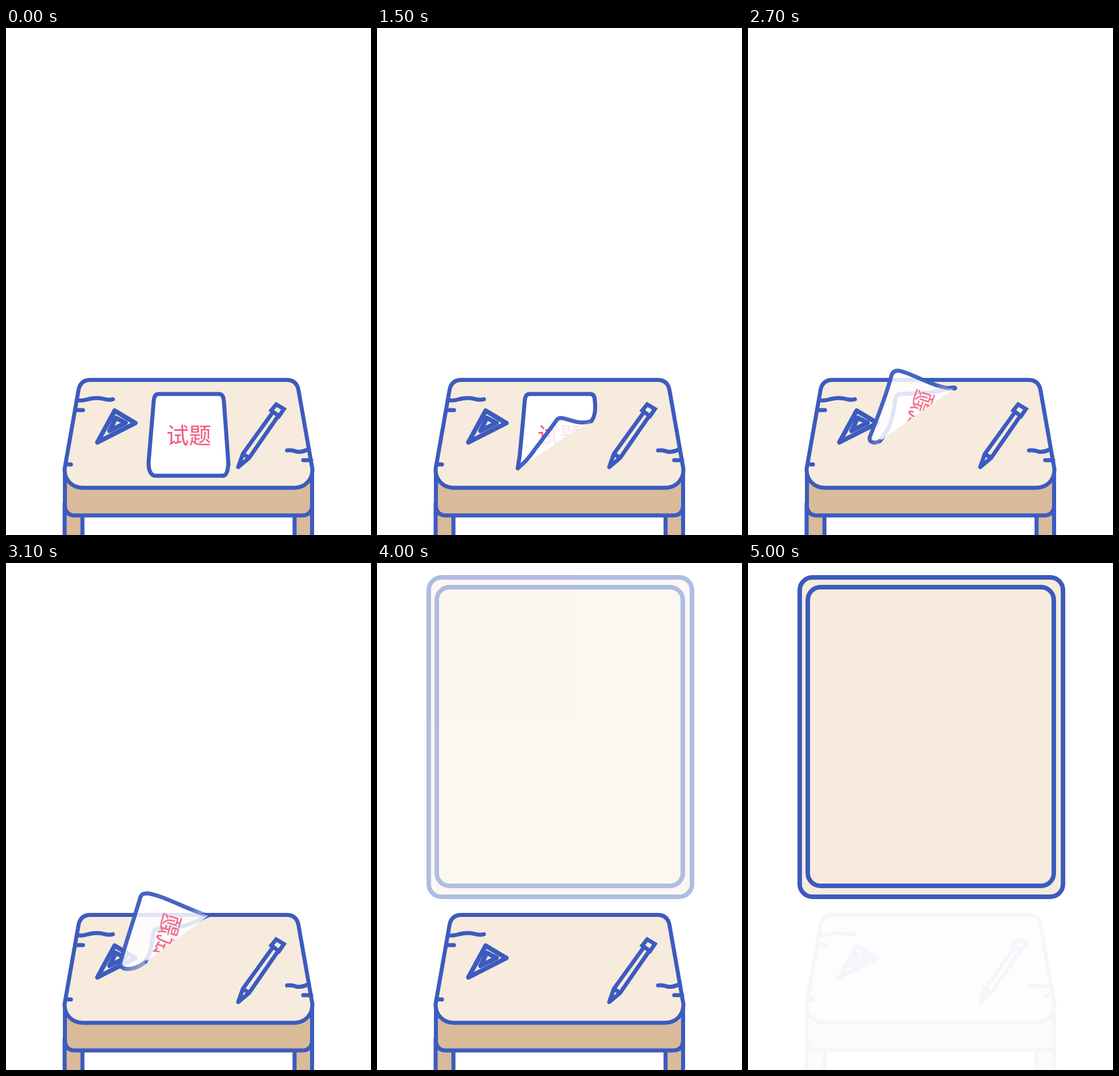
These frames come from a looping animation (635x881 px, 5200 ms). An HTML page without scripts:

```html
<!DOCTYPE html>
<html lang="zh">
<head>
<meta charset="utf-8">
<title>Desk and paper</title>
<style>
html, body { margin: 0; width: 100%; height: 100%; overflow: hidden; background: #fff; }
svg { display: block; width: 635px; height: 881px; }

.line { stroke: #3c5bbf; stroke-width: 7; stroke-linecap: round; stroke-linejoin: round; }
.cream { fill: #f6ebdc; }
.tan { fill: #d9bb9a; }
.none { fill: none; }
.word {
  font: 400 39px "Noto Sans CJK SC", "Noto Sans CJK", sans-serif;
  fill: #f2577c; text-anchor: middle;
}

/* everything advances in 100 ms ticks */
.desk, .board, .sheet, .front, .flap, .back, .fade {
  animation: 5.2s -5ms infinite;
}
.desk { animation-name: desk; }
.board { animation-name: board; }
.sheet { animation-name: sheet; }
.front { animation-name: front; }
.flap { animation-name: flap; }
.back { animation-name: back; }
.fade { animation-name: fade; }

@keyframes desk {
  0% { opacity: 1; animation-timing-function: steps(1); }
  84.615% { opacity: 1; animation-timing-function: steps(1); }
  86.538% { opacity: .98; animation-timing-function: steps(5); }
  96.154%, 100% { opacity: .05; }
}
@keyframes board {
  0% { opacity: 0; animation-timing-function: steps(1); }
  67.308% { opacity: 0; animation-timing-function: steps(12); }
  90.385% { opacity: .98; animation-timing-function: steps(1); }
  92.308%, 100% { opacity: 1; }
}
@keyframes sheet {
  0% { transform: translate(0, 0); opacity: 1; animation-timing-function: steps(1); }
  59.615% { transform: translate(0, 0); opacity: 1; animation-timing-function: steps(1); }
  61.538% { transform: translate(-5px, -5px); opacity: 1; animation-timing-function: steps(4); }
  69.231% { transform: translate(-18px, -182px); opacity: .23; animation-timing-function: steps(1); }
  71.154% { transform: translate(-21px, -226px); opacity: .04; animation-timing-function: steps(1); }
  73.077%, 100% { transform: translate(-25px, -270px); opacity: 0; }
}

/* part of the sheet still lying on the desk, open along the fold */
@keyframes front {
  0%, 3.846% {
    d: path("M377 778L259 778Q248 776 248 755C251 720 254 685 257 648Q258 636 265 636C300 636 336 636 371 636Q378 636 379 648C382 685 384 720 387 758");
    animation-timing-function: steps(6);
  }
  15.385% {
    d: path("M264 778L259 778Q248 776 248 755C251 720 254 685 257 648Q258 636 265 636C300 636 336 636 371 636Q378 636 379 648C381 680 389 712 384 732");
    animation-timing-function: steps(7);
  }
  28.846% {
    d: path("M245 765L245 764Q246 757 248 745C251 715 254 685 257 648Q258 636 265 636C300 636 336 636 371 636Q379 636 379 648C381 665 379 675 373 683");
    animation-timing-function: steps(5);
  }
  38.462% {
    d: path("M234 747L235 745Q240 738 244 725C251 705 253 680 257 648Q258 636 265 636C300 636 336 636 366 636Q376 636 377 643C377 649 376 652 371 656");
    animation-timing-function: steps(3);
  }
  44.231% {
    d: path("M226 738L228 735Q236 725 243 708C250 690 254 670 256 648Q258 636 265 636C295 636 330 638 350 634Q374 629 373 633C372 637 368 642 362 646");
    animation-timing-function: steps(3);
  }
  50% {
    d: path("M226 724L228 722Q238 708 243 700C250 682 254 668 256 648Q257 636 265 636C285 635 315 636 338 631Q364 623 365 627C365 629 363 629 360 630");
    animation-timing-function: steps(5);
  }
  59.615%, 61.538% {
    d: path("M243 692L244 690Q249 682 251 674C254 664 255 655 256 646Q257 636 265 635C285 633 305 634 320 627Q335 622 340 618C345 616 348 614 352 612");
    animation-timing-function: steps(4);
  }
  69.231%, 100% {
    d: path("M254 704L255 702Q262 690 264 684C268 676 272 668 276 664Q280 661 288 660C300 657 310 654 320 652Q328 650 332 648C334 647 336 646 338 645");
  }
}

/* folded-over part, seen from behind */
@keyframes flap {
  0%, 3.846% {
    d: path("M377 778C379 778 381 777 382 776C383 774 384 772 385 770Q386 765 386 762C387 760 387 759 387 758Q387 758 387 758");
    fill-opacity: 1; animation-timing-function: steps(6);
  }
  15.385% {
    d: path("M264 778C280 778 295 772 305 764C320 750 335 735 345 723Q349 718 355 719C365 722 378 733 385 732Q385 732 385 732");
    fill-opacity: .84; animation-timing-function: steps(7);
  }
  28.846% {
    d: path("M245 765C255 757 266 745 274 733C290 712 303 695 312 682Q315 677 323 678C338 681 355 690 373 683Q373 683 373 683");
    fill-opacity: .84; animation-timing-function: steps(5);
  }
  38.462% {
    d: path("M234 747C240 738 246 728 250 715C262 690 272 668 285 645Q288 639 296 640C312 645 340 662 371 656Q371 656 371 656");
    fill-opacity: .84; animation-timing-function: steps(3);
  }
  44.231% {
    d: path("M226 738C233 730 240 715 245 705C254 680 262 655 268 630Q271 621 280 621C300 624 325 645 362 645Q362 645 362 645");
    fill-opacity: .84; animation-timing-function: steps(3);
  }
  50% {
    d: path("M226 724C220 727 212 724 215 715C226 690 243 650 254 608Q257 600 267 601C292 606 325 632 360 630Q360 630 360 630");
    fill-opacity: .84; animation-timing-function: steps(5);
  }
  59.615%, 61.538% {
    d: path("M243 693C230 704 205 712 198 698C208 660 224 615 234 580Q236 574 246 574C275 578 315 602 352 613Q352 613 352 613");
    fill-opacity: .84; animation-timing-function: steps(4);
  }
  69.231%, 100% {
    d: path("M254 705C240 715 202 716 198 698C208 660 224 615 234 580Q236 574 246 574C285 580 330 607 360 616Q370 619 338 645");
    fill-opacity: .84;
  }
}
@keyframes back {
  0% { transform: translate(325px, 700px) rotate(-65deg) scale(1, -1); opacity: 0; animation-timing-function: steps(1); }
  32.692% { transform: translate(325px, 700px) rotate(-65deg) scale(1, -1); opacity: 0; animation-timing-function: steps(6); }
  44.231% { transform: translate(315px, 687px) rotate(-69deg) scale(1, -1); opacity: .9; animation-timing-function: steps(8); }
  59.615% { transform: translate(280px, 648px) rotate(-74deg) scale(1, -1); opacity: .95; animation-timing-function: steps(5); }
  69.231%, 100% { transform: translate(283px, 652px) rotate(-74deg) scale(1, -1); opacity: .95; }
}
@keyframes fade {
  0%, 3.846% { stop-opacity: 1; animation-timing-function: steps(13); }
  28.846%, 100% { stop-opacity: .2; }
}
</style>
</head>
<body>
<svg viewBox="0 0 635 881">
  <defs>
    <linearGradient id="edge" x1="0" y1="0" x2="1" y2="1">
      <stop offset=".5" stop-color="#3c5bbf" stop-opacity=".95"/>
      <stop class="fade" offset=".68" stop-color="#3c5bbf"/>
    </linearGradient>
    <clipPath id="frontClip"><path class="front"/></clipPath>
    <clipPath id="flapClip"><path class="flap"/></clipPath>
  </defs>

  <g class="desk line">
    <g class="tan">
      <path stroke="none" d="M102 824H133V890H102ZM502 824H532V890H502Z"/>
      <path d="M102.500 766V831Q104 847 120 847H515Q531 847 532.500 831V766Z"/>
      <path class="none" d="M102 826V890M133 850V890M502 850V890M532.500 826V890"/>
    </g>
    <path class="cream" d="M147 611.500H488Q506 611.500 509 630L533 766C534 785 520 799 501 799H134C115 799 101 785 102 766L126 630Q129 611.500 147 611.500Z"/>
    <g class="none">
      <path d="M127 647Q134 648 143 645Q158 641 172 645Q180 647 186 645M123 664H134M105 758L113 758.500"/>
      <path d="M489 734Q497 733 505 736Q514 738 526 732M517 751H531"/>
      <path stroke-width="8" d="M189 665L225 686.500L159 720ZM191 677.500L208 686L180 700Z"/>
      <path style="stroke-linejoin:miter" d="M470 654L483.500 662L475 674.500L461.500 664.500Z"/>
      <path d="M464 668L412 740L404 763L423 747L473 675M412 740L423 747"/>
    </g>
  </g>

  <g class="board line cream" style="stroke-width:7.800px">
    <rect x="90" y="25" width="458" height="555" rx="22"/>
    <rect x="104" y="42" width="428" height="519" rx="22"/>
  </g>

  <g class="sheet">
    <path class="front line" fill="#fff"/>
    <g clip-path="url(#frontClip)"><text class="word" x="318" y="722">试题</text></g>
    <path class="flap line" fill="#fff" style="stroke:url(#edge)"/>
    <g clip-path="url(#flapClip)"><text class="word back" y="14">试题</text></g>
  </g>
</svg>
</body>
</html>
```
